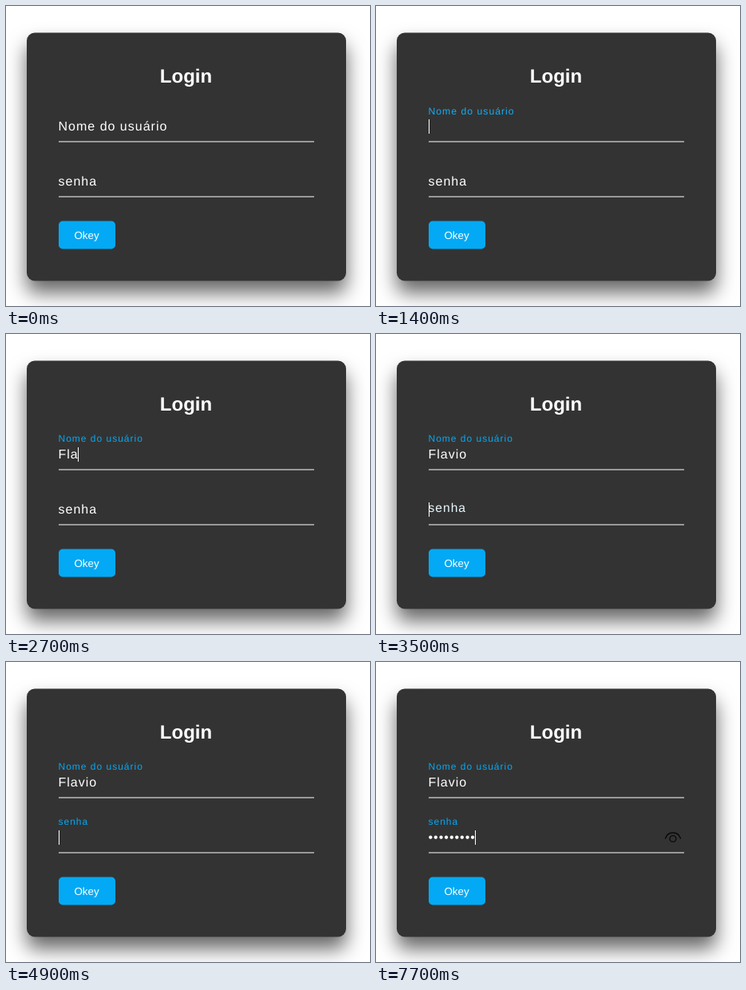
Write an HTML page that moves like this. It is 456 by 376 pixels and loops after 8000 ms.

```html
<!DOCTYPE html>
<html lang="pt">
<head>
<meta charset="utf-8">
<title>Login</title>
<style>
  html, body { margin: 0; width: 100%; height: 100%; overflow: hidden; background: #fff; }
  svg { display: block; }
  text { font: 16px "Liberation Sans", Arial, sans-serif; fill: #fff; text-rendering: geometricPrecision; white-space: pre; }
  .field text { letter-spacing: 1px; }
  .field rect { fill: #fff; }
  .card { fill: #333; filter: drop-shadow(0 15px 12.5px rgba(0, 0, 0, .6)); }
  #title { font-size: 24px; font-weight: bold; text-anchor: middle; }
  #ok { font-size: 13.33px; }
  #tip text { font: 11.4px "Open Sans", "Noto Sans", sans-serif; fill: #444; }
  #eye { fill: none; stroke: #0a0a0a; stroke-width: 1.4; stroke-linecap: round; }
</style>
</head>
<body>
<svg width="456" height="376" viewBox="0 0 456 376">
  <rect class="card" x="26" y="33.5" width="400" height="311" rx="10"/>
  <text id="title" x="225.5" y="96">Login</text>
  <g class="field" id="user">
    <rect x="66" y="169.5" width="320" height="1"/>
    <text class="label">Nome do usuário</text>
    <text class="value" x="65.5" y="156"></text>
    <rect class="caret" y="142" width="1" height="18"/>
  </g>
  <g class="field" id="pass">
    <rect x="66" y="238.5" width="320" height="1"/>
    <text class="label">senha</text>
    <text class="value" x="65.5" y="225"></text>
    <rect class="caret" y="211" width="1" height="18"/>
  </g>
  <g id="eye">
    <path d="M362.5 221C364 216.5 368 214 372 214S380 216.5 381.5 221"/>
    <circle cx="372" cy="221.5" r="3.9"/>
  </g>
  <rect x="66" y="269.5" width="71" height="35" rx="5" fill="#03a9f4"/>
  <text id="ok" x="85.5" y="292">Okey</text>
  <g id="tip">
    <rect x="216" y="172" width="130" height="23" fill="#fff"/>
    <text x="223" y="188">Preencha este campo.</text>
  </g>
</svg>
<script>
const LOOP = 8000, STEP = 100, BLINK = 525, SLIDE = 500;
const $ = s => document.querySelector(s);
const show = (el, on) => el.setAttribute("visibility", on ? "visible" : "hidden");
const mix = (a, b, p) => a + (b - a) * p;

const fields = [
  { id: "user", base: 156, slide: 1050, focus: 1050, blur: 3500, text: "Flavio",
    keys: [2300, 2500, 2700, 3000, 3100, 3100] },
  { id: "pass", base: 225, slide: 3450, focus: 3500, blur: LOOP, text: "•".repeat(9),
    keys: [5000, 5200, 5500, 5600, 5700, 6300, 6400, 6500, 6550] }
];
for (const f of fields)
  for (const part of ["label", "value", "caret"]) f[part] = $(`#${f.id} .${part}`);

// The CSS "ease" curve, cubic-bezier(.25, .1, .25, 1)
function ease(x) {
  if (x <= 0) return 0;
  if (x >= 1) return 1;
  const bezier = (a, b, u) => 3 * a * u * (1 - u) ** 2 + 3 * b * u * u * (1 - u) + u ** 3;
  let lo = 0, hi = 1;
  for (let i = 0; i < 24; i++) {
    const mid = (lo + hi) / 2;
    if (bezier(.25, .25, mid) < x) lo = mid; else hi = mid;
  }
  return bezier(.1, 1, lo);
}

function drawField(f, t) {
  const p = ease((t - f.slide) / SLIDE);
  f.label.setAttribute("x", 65.5);
  f.label.setAttribute("y", f.base - 21 * p);
  f.label.style.fontSize = mix(16, 12, p) + "px";
  f.label.style.fill = `rgb(${mix(255, 3, p)}, ${mix(255, 169, p)}, ${mix(255, 244, p)})`;

  const typed = f.keys.filter(k => k <= t).length;
  f.value.textContent = f.text.slice(0, typed);
  const width = typed ? f.value.getComputedTextLength() : 0;
  f.caret.setAttribute("x", Math.max(66, Math.floor(65.5 + width)));
  const last = typed ? f.keys[typed - 1] : f.focus;
  show(f.caret, t >= f.focus && t < f.blur && Math.floor((t - last) / BLINK) % 2 === 0);
}

function frame() {
  const t = Math.floor(performance.now() % LOOP / STEP) * STEP;
  for (const f of fields) drawField(f, t);
  show($("#tip"), t >= 1700 && t < 1900);
  show($("#eye"), t >= fields[1].keys[0]);
  requestAnimationFrame(frame);
}
frame();
</script>
</body>
</html>
```
